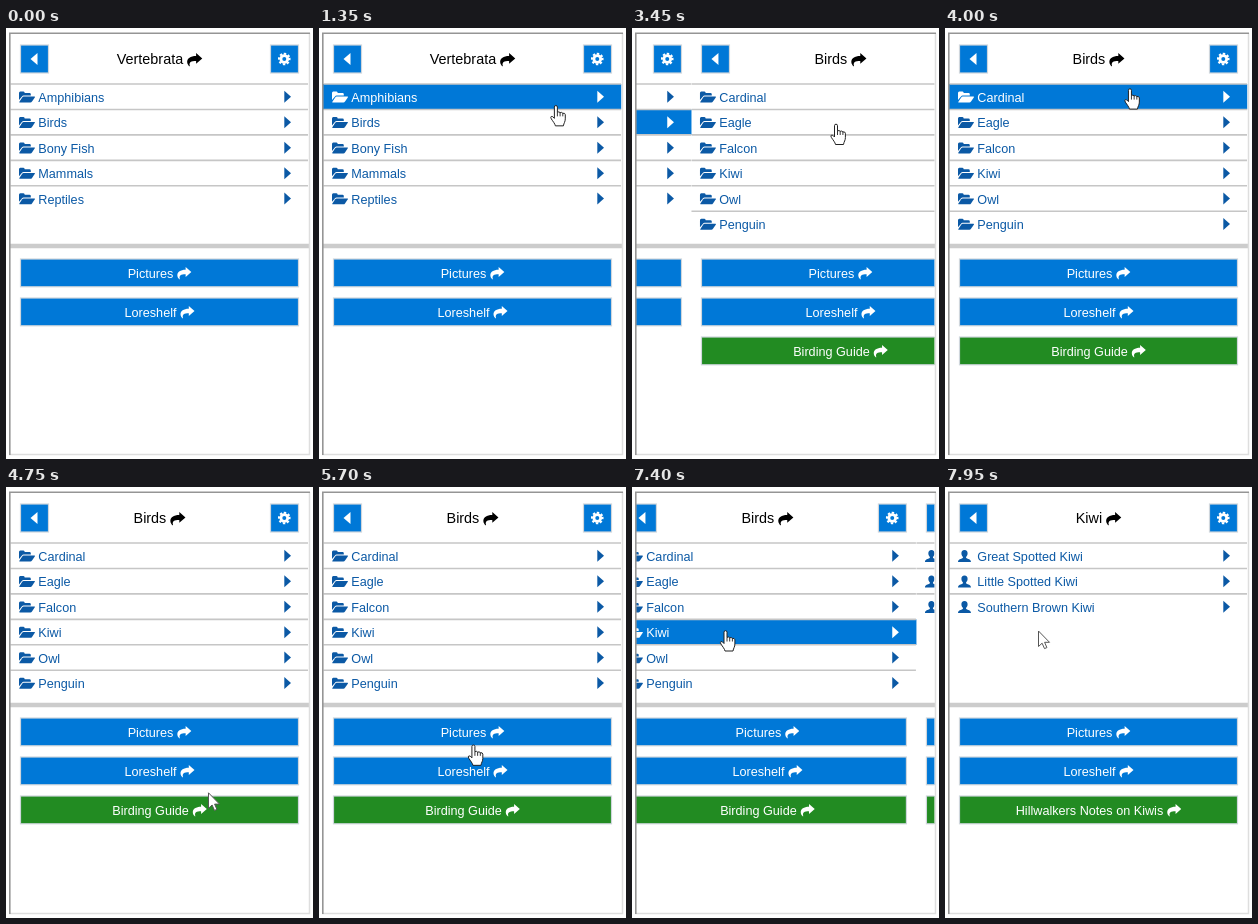
Write an HTML page that moves like this. It is 307 by 431 pixels and loops after 8 s.

```html
<!DOCTYPE html>
<html lang="en">
<head>
<meta charset="utf-8">
<title>Sliding menu</title>
<style>
  html, body { margin: 0; width: 100%; height: 100%; overflow: hidden; background: #fff; }
  svg { display: block; width: 307px; height: 431px; font-family: "Liberation Sans", Arial, sans-serif; }
  .row { fill: #0b59a5; font-size: 12.65px; }
  .row .bg { fill: none; }
  .row.hover { fill: #fff; }
  .row.hover .bg { fill: #0078d7; }
  .button { fill: #fff; font-size: 12.65px; }
  .title { fill: #000; font-size: 14.4px; }
</style>
</head>
<body>
<svg id="stage" viewBox="0 0 307 431">
  <defs>
    <clipPath id="view"><rect x="4" y="5" width="298.5" height="421"/></clipPath>
    <path id="share" d="M14 5 8.3 0V2.7C3 2.7 0 5 0 8.2 0 10 1 11.5 2 12.3 2.3 12.5 2.6 12.3 2.5 11.9 1.5 8.5 3.5 7.3 8.3 7.3V10Z"/>
    <g id="folder">
      <path d="M0 9V2Q0 .5 1.3.5H4.5Q5.7.5 5.7 2H10.5Q11.8 2 11.8 3.3V4.6H4.6Q3.6 4.6 3 5.4Z"/>
      <path d="M4.6 5.6H15.5Q16.3 5.6 15.8 6.4L13 10.6Q12.4 11.5 11.4 11.5H.6Q-.1 11.5.4 10.7L3.2 6.4Q3.8 5.6 4.6 5.6Z"/>
    </g>
    <path id="person" d="M6.5 0C8.6 0 9.7 1.5 9.6 3.5 9.5 5.2 8.8 6.2 8.1 6.9V8C10 9 12.8 9.2 13 12H0C.2 9.2 3 9 4.9 8V6.9C4.2 6.2 3.5 5.2 3.4 3.5 3.3 1.5 4.4 0 6.5 0Z"/>
  </defs>
  <g id="panels" clip-path="url(#view)"></g>
  <path d="M4 218H303" stroke="#ccc" stroke-width="4.5"/>
  <path d="M303.5 5V426.5H3" fill="none" stroke="#dedede" stroke-width="1.5"/>
  <path d="M3.8 427V5.3H304" fill="none" stroke="#959595" stroke-width="1.6"/>
  <g id="cursor" fill="#fff" stroke="#222" stroke-linejoin="round">
    <path id="arrow" stroke="#555" d="M0 0V15.5L3.6 12.2 6 17.6 8.4 16.6 6.1 11.3H11Z"/>
    <g id="hand">
      <path d="M-1.5 1.2Q-1.5-.3 0-.3 1.5-.3 1.5 1.2V6.5Q3-.0 4.2 6.8 5.7 6 6.9 7.4 9-.0 9.3 8.8V13C9.3 16 8 17 7.5 20H-.5C-.8 18-3 15.5-4.6 13-5.6 11.3-4.6 10.6-3.4 10-1.5 12.5Z" style="display:none"/>
      <path d="M-1.5 1.2Q-1.5-.3 0-.3T1.5 1.2V6.4Q3.2 5.4 4.2 6.8 5.9 6 6.9 7.4 9.2 7 9.4 8.8V13C9.4 16 8 17 7.5 20H-.5C-.8 18-3 15.5-4.6 13Q-5.6 11.3-4.6 10.6-3.4 10-1.5 12.5Z"/>
      <path d="M1.5 6.4V10.5M4.2 6.8V10.5M6.9 7.4V10.5" fill="none" stroke-width=".9"/>
    </g>
  </g>
</svg>
<script>
const LOOP = 8000, PITCH = 298, ROW = 25.45, LIST_TOP = 56, MIDDLE = 153.5;
const BLUE = '#0078d7', GREEN = '#228b22';
const SLIDE_MS = 322, SLIDES = [3220, 7350];
const BUTTON_TOPS = [231, 270, 309];
const MENUS = [
  { title: 'Vertebrata', icon: 'folder', rows: ['Amphibians', 'Birds', 'Bony Fish', 'Mammals', 'Reptiles'] },
  { title: 'Birds', icon: 'folder', rows: ['Cardinal', 'Eagle', 'Falcon', 'Kiwi', 'Owl', 'Penguin'], guide: 'Birding Guide' },
  { title: 'Kiwi', icon: 'person', rows: ['Great Spotted Kiwi', 'Little Spotted Kiwi', 'Southern Brown Kiwi'], guide: 'Hillwalkers Notes on Kiwis' },
];
// Pointer path: time, x, y
const PATH = [
  [950, 305, 268], [1250, 252, 130], [1500, 218, 28], [1750, 196, 90], [2050, 184, 152],
  [2300, 188.5, 113], [2600, 204, 96.5], [3600, 204, 96.5], [3900, 196, 78], [4200, 165, 32],
  [4500, 186, 180], [4750, 202.5, 305.5], [5100, 195, 362], [5400, 174, 315], [5700, 154.5, 258.5],
  [6050, 118, 205], [6450, 93.5, 171], [6600, 93.5, 161], [6850, 93.5, 144], [8000, 93.5, 144],
];

const byId = id => document.getElementById(id);
function add(parent, tag, attrs = {}, text = '') {
  const node = document.createElementNS('http://www.w3.org/2000/svg', tag);
  for (const key in attrs) node.setAttribute(key, attrs[key]);
  node.textContent = text;
  parent.append(node);
  return node;
}

function addBox(parent, x, y, width, height, fill) {
  add(parent, 'rect', { x, y, width, height, fill, stroke: '#cfd6dc', 'stroke-width': 1.2 });
}

// Centred label followed by the share arrow
function addLink(parent, label, baseline, className, scale) {
  const group = add(parent, 'g', { class: className });
  const text = add(group, 'text', { y: baseline }, label);
  const width = text.getComputedTextLength();
  const left = MIDDLE - (width + 4 + 14 * scale) / 2;
  text.setAttribute('x', left);
  add(group, 'use', { href: '#share', transform: `translate(${left + width + 4} ${baseline - 11}) scale(${scale})` });
}

function addGear(parent) {
  const gear = add(parent, 'g', { fill: 'none', stroke: '#fff', transform: 'translate(278.3 31)' });
  add(gear, 'circle', { r: 3.4, 'stroke-width': 2.8 });
  const tooth = 2 * Math.PI * 5.3 / 8;
  add(gear, 'circle', { r: 5.3, 'stroke-width': 2, 'stroke-dasharray': `${tooth * .55} ${tooth * .45}`, transform: 'rotate(-12)' });
}

function buildPanel(menu) {
  const panel = add(byId('panels'), 'g');
  addBox(panel, 14.5, 17, 28, 28, BLUE);
  add(panel, 'path', { d: 'M24.5 31 31.5 25V37Z', fill: '#fff' });
  addLink(panel, menu.title, 36, 'title', 1.08);
  addBox(panel, 264.5, 17, 28, 28, BLUE);
  addGear(panel);

  const rows = menu.rows.map((label, i) => {
    const y = LIST_TOP + i * ROW;
    const row = add(panel, 'g', { class: 'row', transform: `translate(0 ${y})` });
    add(row, 'rect', { class: 'bg', x: 4, width: PITCH + .5, height: ROW });
    add(row, 'path', { d: `M4.5 0H${4 + PITCH}`, stroke: '#c6c6c6', 'stroke-width': 1.6 });
    add(row, 'use', { href: '#' + menu.icon, x: 13, y: 7 });
    add(row, 'text', { x: 32.3, y: 18 }, label);
    add(row, 'path', { d: 'M278.3 6.8V18.8L285 12.8Z' });
    return row;
  });

  ['Pictures', 'Loreshelf', menu.guide].forEach((label, i) => {
    if (!label) return;
    const y = BUTTON_TOPS[i];
    addBox(panel, 14.5, y, 278, 27.8, i === 2 ? GREEN : BLUE);
    addLink(panel, label, y + 19, 'button', 1);
  });
  return { panel, rows, buttons: menu.guide ? 3 : 2 };
}

const views = MENUS.map(buildPanel);

function slideProgress(time, start) {
  const p = Math.min(1, Math.max(0, (time - start) / SLIDE_MS));
  return (1 - Math.cos(Math.PI * p)) / 2;
}

// Smooth interpolation that never overshoots a turning point
function tangent(i, axis) {
  const a = PATH[i - 1], b = PATH[i], c = PATH[i + 1];
  if (!a || !c || (b[axis] - a[axis]) * (c[axis] - b[axis]) <= 0) return 0;
  return (c[axis] - a[axis]) / (c[0] - a[0]);
}

function pointer(time, axis) {
  const i = Math.max(1, PATH.findIndex(p => p[0] >= time));
  const a = PATH[i - 1], b = PATH[i], span = b[0] - a[0], s = (time - a[0]) / span;
  const blend = s * s * (3 - 2 * s);
  return a[axis] + (b[axis] - a[axis]) * blend
    + span * s * (1 - s) * ((1 - s) * tangent(i - 1, axis) - s * tangent(i, axis));
}

function draw(time) {
  const position = SLIDES.reduce((sum, start) => sum + slideProgress(time, start), 0);
  const current = Math.floor(position), sliding = position !== current;
  const shown = time >= PATH[0][0];
  const x = pointer(time, 1), y = pointer(time, 2);
  const hovered = shown && x < 303 ? Math.floor((y - LIST_TOP) / ROW) : -1;

  views.forEach((view, i) => {
    const offset = (i - position) * PITCH;
    view.panel.setAttribute('transform', `translate(${offset} 0)`);
    view.panel.style.display = Math.abs(offset) < PITCH ? '' : 'none';
    view.rows.forEach((row, n) => row.classList.toggle('hover', i === current && n === hovered));
  });

  const { rows, buttons } = views[current];
  const onButton = x > 14 && x < 293 && BUTTON_TOPS.slice(0, buttons).some(top => y >= top && y <= top + 28);
  const onTitle = Math.abs(x - MIDDLE) < 43 && y > 22 && y < 40;
  const pointing = sliding || rows[hovered] || onButton || onTitle;
  byId('cursor').style.display = shown ? '' : 'none';
  byId('cursor').setAttribute('transform', `translate(${x} ${y})`);
  byId('hand').style.display = pointing ? '' : 'none';
  byId('arrow').style.display = pointing ? 'none' : '';
}

const began = performance.now();
function tick() {
  draw((performance.now() - began) % LOOP);
  requestAnimationFrame(tick);
}
tick();
</script>
</body>
</html>
```
